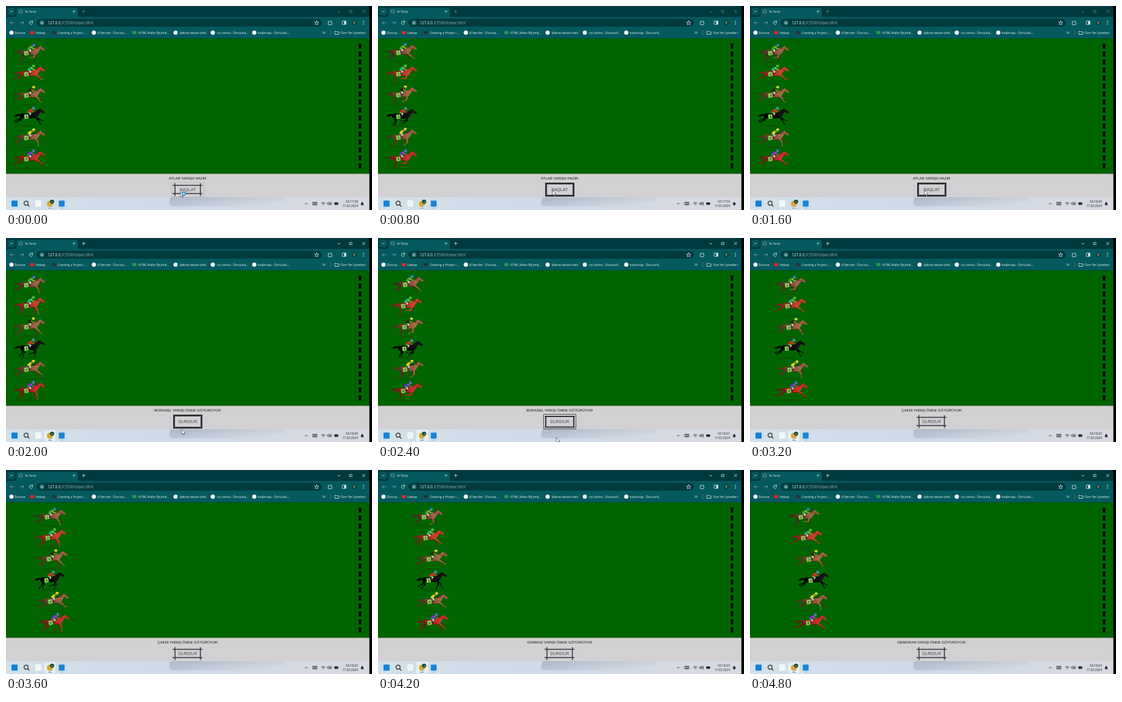
Write an HTML page that moves like this. It is 600x335 px and loops after 5 s.

```html
<!DOCTYPE html>
<html lang="tr">
<head>
<meta charset="utf-8">
<title>At Yarışı</title>
<style>
html, body { margin: 0; width: 100%; height: 100%; overflow: hidden; background: #000; }
svg { display: block; width: 100vw; height: 100vh; }
.ui { font-family: "Open Sans", "Noto Sans", sans-serif; font-size: 5px; fill: #eef6f6; }
.page { font-family: "Liberation Sans", Arial, sans-serif; text-anchor: middle; }
.line { fill: none; stroke: #e4efef; stroke-width: .8; stroke-linecap: round; stroke-linejoin: round; }
.dark { stroke: #222; }
</style>
</head>
<body>
<svg id="stage" viewBox="0 0 600 335" preserveAspectRatio="none">
  <defs>
    <linearGradient id="bar" x2="1" y2="0">
      <stop offset="0" stop-color="#d3e0ea"/><stop offset=".45" stop-color="#cfdae6"/>
      <stop offset="1" stop-color="#d8d9e0"/>
    </linearGradient>
    <linearGradient id="shade" x2="1" y2=".6">
      <stop offset="0" stop-color="#8a95a5" stop-opacity=".5"/><stop offset="1" stop-color="#8a95a5" stop-opacity="0"/>
    </linearGradient>
  </defs>
</svg>
<script>
const LOOP = 5000, STEP = 200;
const stage = document.getElementById('stage');

function add(tag, attrs, parent = stage, text) {
  const node = document.createElementNS('http://www.w3.org/2000/svg', tag);
  for (const k in attrs) node.setAttribute(k, attrs[k]);
  if (text !== undefined) node.textContent = text;
  return parent.appendChild(node);
}
const rect = (x, y, width, height, fill, rx = 0, parent) => add('rect', { x, y, width, height, fill, rx }, parent);
const dot = (cx, cy, r, fill, parent) => add('circle', { cx, cy, r, fill }, parent);
const line = (d, cls = 'line', parent) => add('path', { d, class: cls }, parent);
const label = (x, y, text, more = {}) => add('text', { x, y, class: 'ui', ...more }, stage, text);
const show = (node, on) => node.setAttribute('visibility', on ? 'visible' : 'hidden');
// value of the last [time, value] row that has begun
const at = (rows, t) => rows.reduce((v, row) => t >= row[0] ? row[1] : v, rows[0][1]);

// ---- browser frame
rect(0, 0, 596, 53.2, '#04595f');
rect(0, 0, 596, 18, '#00393d');
rect(2, 3, 13, 12, '#05555a', 3);
line('M7 8.3l1.7 1.7 1.7-1.7');
add('path', { d: 'M14 18q3 0 3-3V6q0-3 3-3h95q3 0 3 3v9q0 3 3 3z', fill: '#04595f' });
line('M21.3 9a3 3 0 1 0 6 0a3 3 0 1 0-6 0M22.2 7l4 4').setAttribute('opacity', .5);
label(31, 11, 'At Yarışı');
line('M110 7.3l3.2 3.2M113.2 7.3l-3.2 3.2');
const controls = line('M125 9h4.6M127.3 6.7v4.6M544 9.3h3.6M563.5 7.3h3.6v3.6h-3.6zM584.4 7l4 4M588.4 7l-4 4');

rect(50, 21, 468, 13, '#013b40', 6.5);
line('M43.2 26a2.6 2.6 0 1 0 .5 2M43.6 24.3v2h-2');
line('M13 27.5H7.4M9.8 25l-2.5 2.5 2.5 2.5M23 27.5h5.6M26.2 25l2.5 2.5-2.5 2.5').setAttribute('opacity', .5);
dot(59, 27.5, 4.8, '#0a5359');
line('M56.8 27.5a2.2 2.2 0 1 0 4.4 0a2.2 2.2 0 1 0-4.4 0M59 27.3v1.3');
const url = label(68.5, 29.6, '127.0.0.1', { style: 'font-size:6.2px' });
add('tspan', { 'fill-opacity': .65 }, url, ':5500/index.html');
line('M509.3 24.3l1 2.2 2.4.2-1.8 1.6.5 2.4-2.1-1.3-2.1 1.3.5-2.4-1.8-1.6 2.4-.2z');
line('M528.7 25.6h1.6q.8-2.4 1.6 0h2v2q2 .8 0 1.6v1.6h-5.2z');
line('M551.6 24.8h5.6v5.4h-5.6z');
rect(554.6, 24.8, 2.6, 5.4, '#eef6f6');
dot(571, 27.5, 4.3, '#12463a');
label(571, 29, 'd', { 'text-anchor': 'middle', style: 'font-size:4.5px' });
for (const y of [25, 27.5, 30]) dot(586, y, .7, '#fff');

const marks = [
  [9, 14.5, 'Doruva', '#f4f6f5'], [42.5, 48, 'Izlekap', '#e32620', 1],
  [78.5, 85, 'Creating a Project -...', '#263238', 1], [144, 150, 'k7dersler - Doruva...', '#f4f6f5'],
  [210.5, 217, 'HTML Metin Biçimle...', '#2c9a58', 1], [278, 284.5, 'İşleme devam edin.', '#eef1f1'],
  [339, 345.5, "css lokma - Doruva'd...", '#f4f6f5'], [407, 413, "kodarnap - Doruva'd...", '#f4f6f5']
];
for (const [x, tx, text, color, square] of marks) {
  square ? rect(x - 3.2, 41.3, 6.4, 5, color, 1) : dot(x, 43.8, 3.5, color);
  label(tx, 45.6, text);
}
line('M519.5 42.2l1.5 1.6-1.5 1.6M522 42.2l1.5 1.6-1.5 1.6M539.5 41.5h2.3l1 1h3.2v4h-6.5z');
line('M532.3 40v7.5').setAttribute('opacity', .3);
label(549, 45.6, 'Tüm Yer İşaretleri');

// ---- track
rect(0, 53.2, 596, 222.3, '#006400');
for (let i = 0; i < 16; i++) rect(578.4, 61.5 + i * 13.1, 3.9, 8.6, '#000');

// ---- panel
rect(0, 275.5, 596, 39, '#d2d0d2');
const status = add('text', { x: 297.7, y: 285.2, class: 'page', 'font-size': 6.03, fill: '#161616' });
const btnText = add('text', { x: 298, y: 303.6, class: 'page', 'font-size': 7.1, fill: '#4b4b50' });
const frames = {
  hash: 'M273 294.6H322M273 308H322M277 291V312M318.6 291V312',
  solid: 'M275.5 291.5h45v20h-45z',
  outer: 'M271.5 289.5h53v24h-53z',
  inner: 'M275 293h46v17.5h-46zM273.5 293h49M273.5 310.5h49'
};
const widths = { hash: 1.5, solid: 3, outer: 1, inner: 2 };
const edges = {};
for (const k in frames) {
  edges[k] = add('path', { d: frames[k], fill: 'none', stroke: '#34353a', 'stroke-width': widths[k] });
}

// ---- taskbar
rect(0, 314, 596, 21, 'url(#bar)');
rect(268, 314, 190, 15, 'url(#shade)', 5);
const focus = rect(62.5, 315.5, 19, 18, '#e6eef4', 2);
rect(9, 319.5, 10, 10, '#1683d8', .8);
line('M29.5 323.8a3.4 3.4 0 1 0 6.8 0a3.4 3.4 0 1 0-6.8 0M35.6 326.4l2.4 2.6', 'line dark').style.strokeWidth = 1.2;
rect(48, 319, 10, 10.5, '#f1f5f5', 1.5);
dot(72, 324.8, 5, '#d9a62e');
dot(75.6, 321.3, 3.4, '#10453f');
label(75.6, 322.8, 'd', { 'text-anchor': 'middle', style: 'font-size:4.2px' });
rect(86.5, 319.5, 9.6, 10, '#1f85cf', 1);
const underline = rect(69, 331.4, 6, 1.2, '#2a75b8', .6);
rect(89.8, 331.6, 3, 1, '#8b929a', .5);
line('M490.4 325.4l1.9-2 1.9 2M503.3 322.2h6.4v4.4h-6.4zM504.6 323.7h3.8M505 325.2h3', 'line dark');
line('M517.2 323.4q2.9-2.6 5.8 0M518.4 325q1.7-1.4 3.4 0M520.1 326.6v.2', 'line dark');
line('M527.4 323.6h1.2l1.6-1.4v4.6l-1.6-1.4h-1.2zM531.8 323q1 1.5 0 3M533 322.2q1.6 2.3 0 4.6', 'line dark');
rect(538.2, 322.4, 6, 4, '#222', 1);
rect(544.2, 323.6, .9, 1.6, '#222');
const clock = label(577, 323.2, '', { 'text-anchor': 'end', style: 'fill:#1d1d1d' });
label(577, 330, '17.03.2024', { 'text-anchor': 'end', style: 'fill:#1d1d1d' });
add('path', { d: 'M581.2 326.4l1-1.4v-1.6q1.8-3 3.6 0v1.6l1 1.4zM583.2 327h1.6v.8h-1.6z', fill: '#222' });

// ---- horses: coat, dark coat, jacket, sleeve, cap, gait offset, distance at each time of WAY
const WAY = [2000, 2400, 2800, 3600, 4800];
const runners = [
  ['#a5634b', '#49291f', '#4a9a3c', '#d8cf30', '#2a78d8', .38, [0, 11, 21, 34, 50]],
  ['#cf4230', '#7a2218', '#1fae74', '#e0c030', '#48b83c', .02, [0, 8, 21, 35, 54]],
  ['#a96a49', '#55331f', '#23281a', '#b8a020', '#e6dc28', .1, [0, 10, 23, 37, 63]],
  ['#141214', '#000000', '#c8322c', '#e04838', '#3592c8', .94, [0, 10, 21, 33, 66]],
  ['#a5664a', '#54321f', '#d8d02a', '#2a2a14', '#e6dc28', .15, [0, 11, 24, 39, 63]],
  ['#cc332c', '#701a14', '#6a3ac8', '#d04ab0', '#4a6ae0', 0, [0, 8, 21, 40, 62]]
];

function makeHorse([coat, dark, jacket, sleeve, cap, phase, way], i) {
  const root = add('g', {});
  const hide = add('linearGradient', { id: 'hide' + i, gradientUnits: 'userSpaceOnUse', x1: 12, y1: 21, x2: 42, y2: 8 }, root);
  add('stop', { offset: 0, 'stop-color': dark }, hide);
  add('stop', { offset: .9, 'stop-color': coat }, hide);
  const skin = `url(#hide${i})`;
  add('ellipse', { cx: 25, cy: 32.4, rx: 14, ry: .5, fill: '#3a2408', opacity: .6 }, root);
  const path = (parent, d, color, width) => add('path', {
    d, fill: 'none', stroke: color, 'stroke-width': width, 'stroke-linecap': 'round', 'stroke-linejoin': 'round'
  }, parent);
  const pair = color => [path(root, '', color, 2.2), path(root, '', color, 1.1)];
  const far = [pair(dark), pair(dark)];
  const body = add('g', {}, root);
  const near = [pair(coat), pair(dark)];
  const shape = (d, fill) => add('path', { d, fill }, body);
  const stroke = (d, color, width) => path(body, d, color, width);
  shape('M14 13.6Q8 12 2 17.2Q5.5 16 8 17.6Q10.5 15 14 15.6z', dark);
  shape('M12.8 16Q13 12.4 17.5 12Q26 13 34 11.4Q40 9 45 5.8L46 4L47.2 5.6Q51 7.6 53.8 10.6L52.8 12.4L50.6 12L47 10.2Q44 12.6 42.2 16.4Q40.5 20 35 20Q27 20.6 20.5 18.6Q18 21 15 19.6Q13 18.4 12.8 16z', skin);
  stroke('M36 10.6Q41 8.6 45.2 5.4', dark, 1);
  stroke('M22 18.9Q29 20.2 37 19.4', dark, 1.1);
  stroke('M48.5 7L48 10.2M51.6 9.2L50.6 11.6M48 10L40 9.8', '#2c1a10', .45);
  shape('M19.6 14.2L26 13.4L27.2 20L20.6 21.2z', '#8ed05f');
  add('text', { x: 23.6, y: 19.2, class: 'page', 'font-size': 5, 'font-weight': 700, fill: '#163a12' }, body, i + 1);
  stroke('M26.5 10.2L30.6 12.4L28.6 15.4', '#e6e2d6', 1.6);
  stroke('M29 15L28 16.6L29.8 17', '#17120f', 1.2);
  shape('M25 10.3Q26 6.2 32 4.6L34.4 6.2Q32.5 9 28.5 11.2z', jacket);
  stroke('M31.8 6.8L33.6 9.4L37.2 9.6', sleeve, 1.3);
  dot(35.4, 5, 1.3, '#c08a68', body);
  shape('M32.6 4.6Q32.4 1.3 35.2 1.3Q37.6 1.5 38 4.2z', cap);
  return { root, body, near, far, phase, way, y: 60 + i * 34.8 };
}
const horses = runners.map(makeHorse);

function setLeg([upper, lower], x, y, swing, bend) {
  const step = (a, n) => [n * Math.sin(a * Math.PI / 180), n * Math.cos(a * Math.PI / 180)];
  const [kx, ky] = step(swing, 7.5), [fx, fy] = step(swing - bend, 6.8);
  const [hx, hy] = step(swing - bend + 55, 1.5);
  upper.setAttribute('d', `M${x} ${y}l${kx} ${ky}`);
  lower.setAttribute('d', `M${x + kx} ${y + ky}l${fx} ${fy}l${hx} ${hy}`);
}

function poseLegs(legs, p) {
  const c = Math.cos(p * 2 * Math.PI), s = Math.sin(p * 2 * Math.PI);
  setLeg(legs[0], 38, 17.2, 18 + 40 * c - 8 * s, 40 - 34 * c + 14 * s);
  setLeg(legs[1], 16.5, 17, -6 - 40 * c + 8 * s, 43 - 13 * c);
}

function travel(way, t) {
  if (t <= WAY[0]) return 0;
  let i = 1;
  while (i < WAY.length - 1 && t > WAY[i]) i++;
  return way[i - 1] + (way[i] - way[i - 1]) * (t - WAY[i - 1]) / (WAY[i] - WAY[i - 1]);
}

// ---- pointer
const pointer = add('g', {});
add('path', { d: 'M0 0V8.6L2 6.8L3.3 9.7L4.7 9L3.4 6.3H6z', fill: '#fff', stroke: '#222', 'stroke-width': .6 }, pointer);
const busy = add('circle', { cx: 5.6, cy: 3.2, r: 2.7, fill: '#bfe4f6', stroke: '#1c7fc0', 'stroke-width': 1.5 }, pointer);

rect(595.7, 0, 4.3, 335, '#000');

// ---- timeline
const lead = name => name + ' YARIŞI ÖNDE GÖTÜRÜYOR';
const statusRows = [[0, 'ATLAR YARIŞA HAZIR'], [2000, lead('BORASEL')], [2800, lead('GÜMRAZ')],
  [3200, lead('ÇAKIN')], [3800, lead('GÜMRAZ')], [4400, lead('DEMORAN')]];
const clockRows = [[0, '17:58'], [200, '17:59'], [1200, '18:00'], [2200, '18:01'], [3200, '18:02'], [4200, '18:03']];
const edgeRows = [
  [0, { hash: 1, outer: .12 }], [400, { outer: .6, inner: .9 }], [600, { solid: .8, inner: .5 }], [800, { solid: 1 }],
  [2200, { solid: .7, outer: .4 }], [2400, { outer: .85, inner: 1 }], [2600, { hash: .8, outer: .3 }], [2800, { hash: 1 }]
];
const pointerRows = [[0, [286, 305]], [400, [286, 302.5]], [2000, [288, 314]], [2200, [291, 324]],
  [2400, [292, 327.5]], [2600, [292, 331]], [2800, null]];

function draw(t) {
  const active = t >= 1800;
  controls.setAttribute('opacity', active ? 1 : .4);
  show(focus, active);
  underline.setAttribute('fill', active ? '#2a75b8' : '#8b929a');
  status.textContent = at(statusRows, t);
  clock.textContent = '03:' + at(clockRows, t);
  btnText.textContent = t < 2000 ? 'BAŞLAT' : 'DURDUR';
  const border = at(edgeRows, t);
  for (const k in edges) edges[k].setAttribute('opacity', border[k] || 0);
  const pos = at(pointerRows, t);
  show(pointer, pos);
  if (pos) pointer.setAttribute('transform', `translate(${pos})`);
  busy.setAttribute('opacity', t < 400 ? 1 : 0);
  for (const h of horses) {
    const p = t / 533.3 + h.phase, wave = Math.sin(p * 2 * Math.PI);
    h.root.setAttribute('transform', `translate(${10 + travel(h.way, t)} ${h.y})`);
    h.body.setAttribute('transform', `translate(0 ${.5 * wave}) rotate(${1.8 * wave} 27 16)`);
    poseLegs(h.near, p);
    poseLegs(h.far, p - .13);
  }
}

let last = -1;
function tick() {
  const t = Math.floor(performance.now() % LOOP / STEP) * STEP;
  if (t !== last) draw(last = t);
  requestAnimationFrame(tick);
}
tick();
</script>
</body>
</html>
```
